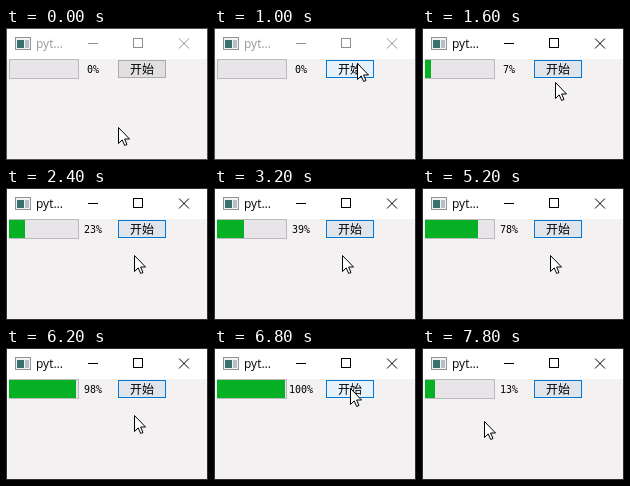
Write an HTML page that moves like this. It is 202x132 px and loops after 8000 ms.

```html
<!DOCTYPE html>
<html lang="zh">
<head>
<meta charset="utf-8">
<title>Progress window</title>
<style>
  html, body { margin: 0; width: 100%; height: 100%; overflow: hidden; background: #f4f1f3; }
  svg { display: block; width: 202px; height: 132px; }
  .caption { font: 12px "Open Sans", "Noto Sans", sans-serif; }
  .percent { font: 10px "DejaVu Sans Mono", "Liberation Mono", monospace; text-anchor: middle; }
  .label { font: 12px "Noto Sans CJK SC", "Noto Sans CJK", sans-serif; text-anchor: middle; }
</style>
</head>
<body>
<svg viewBox="0 0 202 132">
  <defs>
    <linearGradient id="glow">
      <stop offset="0" stop-color="#fff" stop-opacity="0"/>
      <stop offset=".5" stop-color="#fff" stop-opacity=".5"/>
      <stop offset="1" stop-color="#fff" stop-opacity="0"/>
    </linearGradient>
    <clipPath id="filled"><rect id="clip" x="3" y="32" height="18"/></clipPath>
  </defs>
  <rect width="202" height="132" fill="#f4f1f3"/>
  <rect width="202" height="31" fill="#fff"/>

  <g shape-rendering="crispEdges">
    <rect x="9" y="9" width="16" height="13" fill="#8d9499"/>
    <rect x="10" y="10" width="14" height="11" fill="#f1f3f4"/>
    <rect x="11" y="12" width="7" height="8" fill="#39706f"/>
    <rect x="19" y="12" width="4" height="8" fill="#b9c0c4"/>
  </g>
  <text id="caption" class="caption" x="30" y="20">pyt...</text>
  <g id="controls" fill="none">
    <path d="M82 15.5H92M127.5 10.5H136.5V19.5H127.5Z" shape-rendering="crispEdges"/>
    <path d="M173 10.5L183 20.5M183 10.5L173 20.5"/>
  </g>

  <rect x="3.5" y="31.5" width="69" height="19" fill="#e8e5e9" stroke="#bcbabd"/>
  <rect id="fill" x="3" y="32" height="18" fill="#06b025"/>
  <g clip-path="url(#filled)">
    <rect id="shine" y="32" width="60" height="18" fill="url(#glow)"/>
  </g>
  <text id="percent" class="percent" x="87" y="45"></text>

  <rect id="button" x="112.5" y="32.5" width="47" height="17"/>
  <text class="label" x="136" y="46">开始</text>

  <rect id="border" x=".5" y=".5" width="201" height="131" fill="none"/>
  <path id="cursor" d="M.5 .5V16.5L4.2 12.9L6.7 18.5L9 17.5L6.6 12H11.5Z" fill="#fff" stroke="#000"/>
</svg>
<script>
const LOOP = 8000, STEP = 200;
const RATE = 0.01975;            // percent per ms
const STARTS = [1235, 7142];     // progress runs
const ACTIVATED = 1200;

// time, x, y of the pointer tip
const POINTER = [
  [0, 112, 99], [400, 112, 99], [600, 121, 79], [800, 138, 43], [1000, 143, 35],
  [1400, 143, 35], [1600, 133, 54], [1800, 128, 67], [6200, 128, 67],
  [6600, 136, 40], [7200, 136, 40], [7600, 128, 67], [7800, 62, 73]
];

const el = id => document.getElementById(id);
const set = (id, attrs) => {
  for (const name in attrs) el(id).setAttribute(name, attrs[name]);
};

function pointerAt(t) {
  const next = POINTER.findIndex(key => key[0] > t);
  if (next < 0) return POINTER[POINTER.length - 1].slice(1);
  const a = POINTER[next - 1], b = POINTER[next];
  const k = (t - a[0]) / (b[0] - a[0]);
  return [1, 2].map(i => Math.round(a[i] + (b[i] - a[i]) * k));
}

function percentAt(t) {
  const start = t < STARTS[1] ? STARTS[0] : STARTS[1];
  return Math.min(100, Math.max(0, Math.round((t - start) * RATE)));
}

function draw(t) {
  const active = t >= ACTIVATED;
  const [x, y] = pointerAt(t);
  const hover = x >= 112 && x < 160 && y >= 32 && y < 50;
  const percent = percentAt(t);
  const width = percent ? Math.round(1 + 67 * percent / 100) : 0;

  set("caption", { fill: active ? "#000" : "#999" });
  set("controls", { stroke: active ? "#000" : "#8f8f8f" });
  set("border", { stroke: active ? "#303030" : "#505050" });
  set("fill", { width });
  set("clip", { width });
  set("shine", { x: -60 + (t - 3500) * 0.1, opacity: t >= 3500 && t < 4900 ? 1 : 0 });
  set("button", {
    fill: hover ? "#e5f1fb" : active ? "#e0e5ec" : "#e1dfe2",
    stroke: hover || active ? "#0078d7" : "#adabae"
  });
  el("percent").textContent = percent + "%";
  set("cursor", { transform: `translate(${x} ${y})` });
}

const origin = performance.now();
function tick() {
  const t = (performance.now() - origin) % LOOP;
  draw(Math.floor(t / STEP) * STEP);
  requestAnimationFrame(tick);
}
draw(0);
requestAnimationFrame(tick);
</script>
</body>
</html>
```
